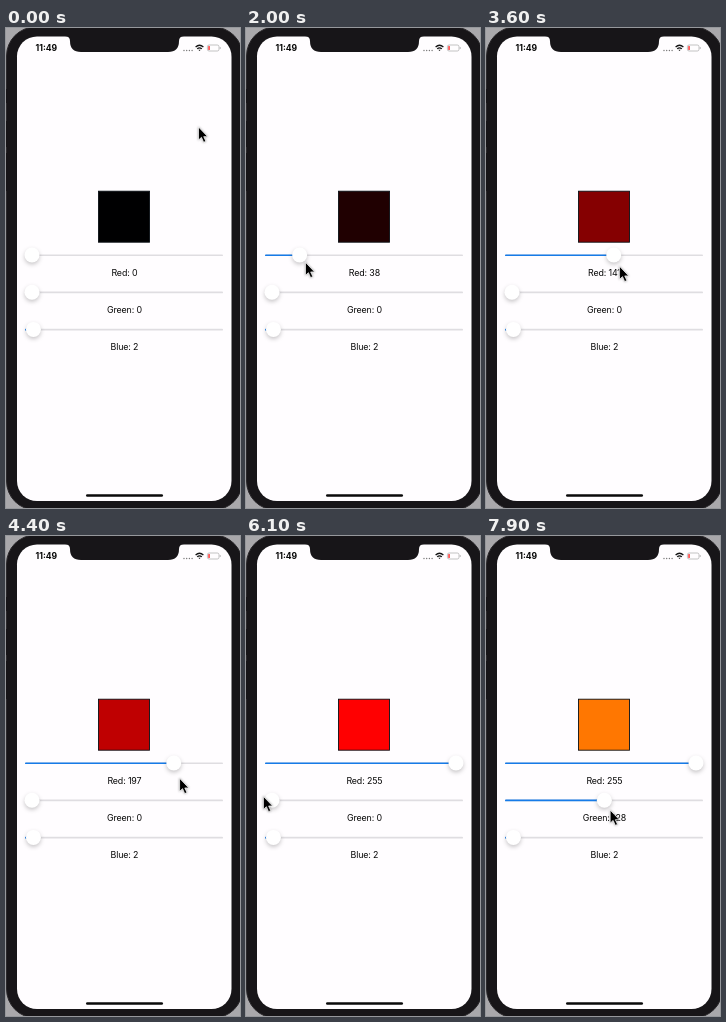
An HTML page for the animation above (8 s loop, 234 by 480 pixels).

```html
<!DOCTYPE html>
<html lang="en">
<head>
<meta charset="utf-8">
<title>Color sliders</title>
<style>
  html, body { margin: 0; width: 100%; height: 100%; overflow: hidden; background: #a9a8ab; }
  svg { display: block; width: 234px; height: 480px; }
  text { font-family: Inter, Roboto, sans-serif; fill: #080808; }
  .label { font-size: 8.9px; letter-spacing: -.15px; text-anchor: middle; }
  .clock { font-size: 8.6px; font-weight: 700; }
  .thumb { fill: #fff; filter: drop-shadow(0 2px 2px rgba(0, 0, 0, .22)); }
  .cursor { filter: drop-shadow(0 .8px .8px rgba(0, 0, 0, .35)); }
</style>
</head>
<body>
<svg viewBox="0 0 234 480">
  <rect x=".5" y="-1" width="236" height="483" rx="29" fill="#171518" stroke="#2a282b"/>
  <path d="M.5 61v14M.5 93v26M.5 125v38" stroke="#171518"/>
  <rect x="11" y="8.5" width="214.5" height="464.5" rx="20" fill="#fffdff"/>
  <path d="M59 8Q64 8.5 64 13Q64 24 75 24H162Q173 24 173 13Q173 8.5 178 8Z" fill="#171518"/>

  <text class="clock" x="29.5" y="23">11:49</text>
  <path d="M178 22.5H187" stroke="#777" stroke-width="1.4" stroke-linecap="round" stroke-dasharray="0 2.7"/>
  <g fill="none" stroke="#111" stroke-width="1.3">
    <path d="M189.6 19Q193.5 15.6 197.4 19M191.2 20.8Q193.5 18.9 195.8 20.8"/>
    <path d="M192.3 21.7h2.4l-1.2 1.3z" fill="#111" stroke="none"/>
  </g>
  <rect x="201.4" y="17" width="11.6" height="6" rx="1.7" fill="none" stroke="#aaa" stroke-width=".7"/>
  <rect x="202.3" y="18" width="1.5" height="4" rx=".5" fill="#f33"/>
  <path d="M214.2 19v2" stroke="#aaa" stroke-width=".8"/>

  <rect id="swatch" x="92.5" y="163.2" width="51" height="51" stroke="#0b1016" stroke-width=".9"/>
  <g id="sliders"></g>
  <rect x="80" y="466.2" width="77" height="2.5" rx="1.25" fill="#0a0a0a"/>

  <g id="cursor" class="cursor">
    <path transform="translate(.5 1) scale(.9)" d="M0 0V14.5L3.3 11.5L5.7 17L8.2 15.9L5.8 10.7H10.2Z" fill="#000" stroke="#fff" stroke-width=".8" stroke-linejoin="round"/>
  </g>
</svg>
<script>
const LOOP = 8000, STEP = 100;
const TRACK_LEFT = 19, TRACK_RIGHT = 217, THUMB_MIN = 26, THUMB_MAX = 210;

// Slider drags as [ms, value] points.
const redDrag = [[1500, 0], [2700, 92], [3600, 141], [5200, 252], [5400, 255]];
const greenDrag = [[6600, 0], [6900, 27], [7900, 128]];

const byId = id => document.getElementById(id);
const progress = (time, from, to) => Math.min(1, Math.max(0, (time - from) / (to - from)));
const thumbX = value => THUMB_MIN + (THUMB_MAX - THUMB_MIN) * value / 255;

function valueAt(points, time) {
  return points.slice(1).reduce((value, [end, target], i) => {
    const [begin, origin] = points[i];
    return value + (target - origin) * progress(time, begin, end);
  }, points[0][1]);
}

// Quadratic curve; its control point makes the pointer overshoot and come back.
function swoop(p, start, control, end) {
  const q = 1 - p;
  return start.map((s, i) => q * q * s + 2 * q * p * control[i] + p * p * end[i]);
}

// The pointer holds the thumb and sinks slowly while it drags.
const grip = (value, y, sink) => [thumbX(value) + 5.3, y + sink * (value / 255) ** 2];

function cursorAt(time, red, green) {
  if (time < 1500) return swoop(progress(time, 200, 1200), [192, 98], [28, 325], grip(0, 233, 0));
  if (time < 5500) return grip(red, 233, 14);
  if (time < 6600) return swoop(progress(time, 5500, 6500), grip(255, 233, 14), [-60, 260], grip(0, 264, 0));
  return grip(green, 264, 36);
}

function add(parent, tag, attrs) {
  const node = document.createElementNS(parent.namespaceURI, tag);
  for (const name in attrs) node.setAttribute(name, attrs[name]);
  return parent.appendChild(node);
}

function makeSlider(name, y) {
  const root = byId("sliders");
  const bar = { x: TRACK_LEFT, y: y - .6, height: 1.7, rx: .85 };
  add(root, "rect", { ...bar, width: TRACK_RIGHT - TRACK_LEFT, fill: "#dfdde1" });
  const fill = add(root, "rect", { ...bar, fill: "#167be8" });
  const thumb = add(root, "circle", { class: "thumb", cy: y, r: 7.5 });
  const label = add(root, "text", { class: "label", x: 118.4, y: y + 20.7 });
  return value => {
    const x = thumbX(value);
    fill.setAttribute("width", x - TRACK_LEFT);
    thumb.setAttribute("cx", x);
    label.textContent = `${name}: ${Math.round(value)}`;
  };
}

const setters = ["Red", "Green", "Blue"].map((name, i) => makeSlider(name, 227 + 37.2 * i));

function render(now) {
  const time = Math.floor(now % LOOP / STEP) * STEP;
  const color = [valueAt(redDrag, time), valueAt(greenDrag, time), 2];
  setters.forEach((set, i) => set(color[i]));
  const shown = color.map(v => Math.round(255 * (v / 255) ** 1.1));
  byId("swatch").setAttribute("fill", `rgb(${shown})`);
  byId("cursor").setAttribute("transform", `translate(${cursorAt(time, color[0], color[1])})`);
}

const start = performance.now();
function tick() {
  render(performance.now() - start);
  requestAnimationFrame(tick);
}
tick();
</script>
</body>
</html>
```
